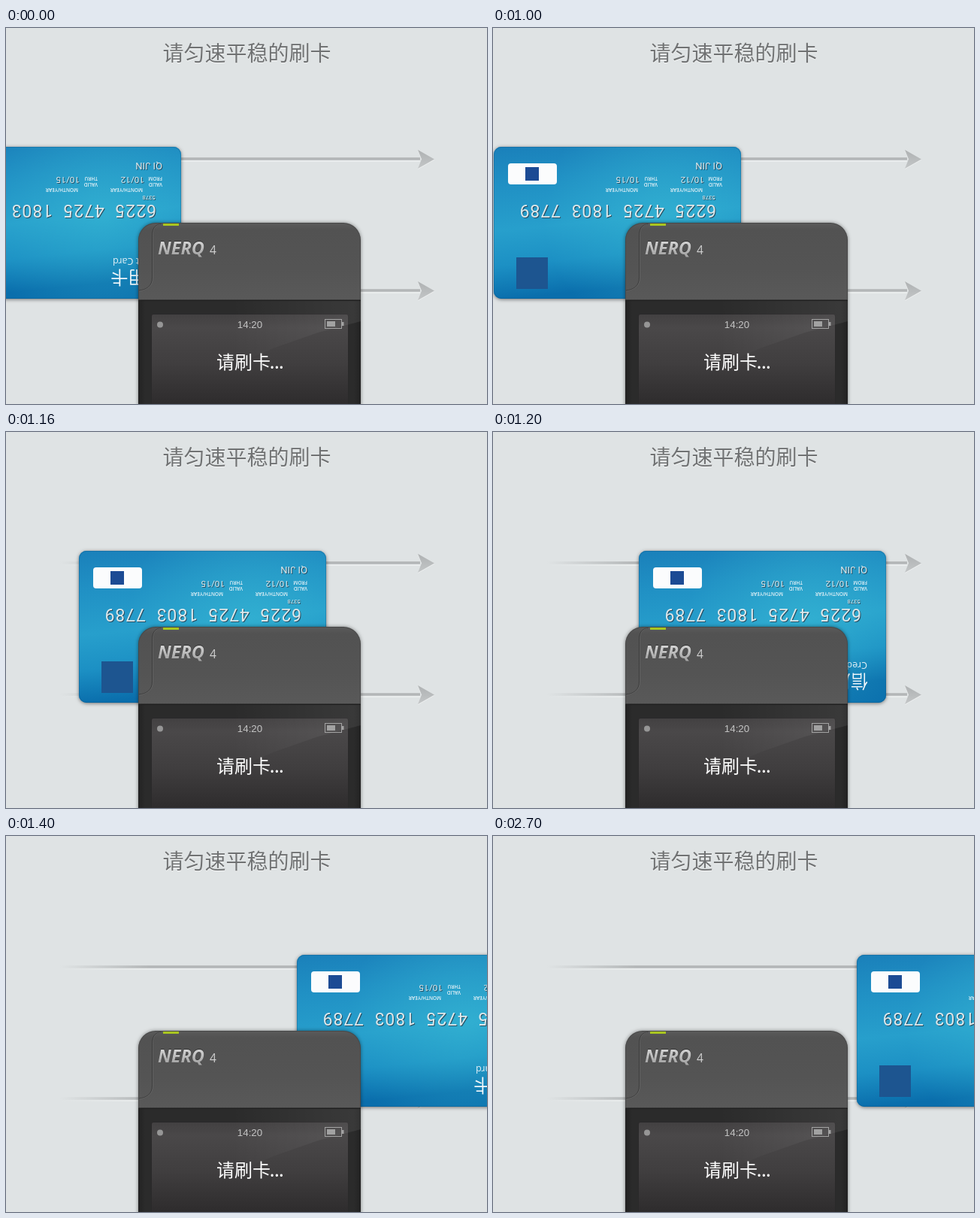
Recreate the animation shown at these times as an HTML page with a canvas. Size 640x500 px, loop 3.5 s.

```html
<!DOCTYPE html>
<html lang="zh-CN">
<head>
<meta charset="utf-8">
<title>刷卡</title>
<style>
html, body { margin: 0; width: 100%; height: 100%; overflow: hidden; background: #dfe3e4; }
canvas { display: block; }
</style>
</head>
<body>
<canvas id="stage" width="640" height="500"></canvas>
<script>
const ctx = document.getElementById('stage').getContext('2d');
const CJK = '"Noto Sans CJK SC", "Noto Sans CJK", sans-serif';
const SANS = '"Open Sans", "Noto Sans", sans-serif';
const DIGITS = 'Roboto, sans-serif';
const LOOP = 3500, HOLD = 1000, STEP = 100, LAST = 6;
const CARD = { w: 329, h: 202, y: 158, from: -96, to: 484 };

function text(str, x, y, font, color, align = 'left') {
  ctx.font = font;
  ctx.fillStyle = color;
  ctx.textAlign = align;
  ctx.fillText(str, x, y);
}

function raised(str, x, y, font, spacing = '0px') {
  ctx.letterSpacing = spacing;
  text(str, x - 1, y - 1, font, 'rgba(40,50,62,.75)');
  text(str, x, y, font, '#dde8eb');
  ctx.letterSpacing = '0px';
}

function fade(x0, y0, x1, y1, ...stops) {
  const g = ctx.createLinearGradient(x0, y0, x1, y1);
  stops.forEach(([at, color]) => g.addColorStop(at, color));
  return g;
}

function box(x, y, w, h, r, fill) {
  ctx.beginPath();
  ctx.roundRect(x, y, w, h, r);
  ctx.fillStyle = fill;
  ctx.fill();
}

function shadow(color, blur, y = 0) {
  ctx.shadowColor = color;
  ctx.shadowBlur = blur;
  ctx.shadowOffsetY = y;
}

function polygon(points, fill) {
  ctx.beginPath();
  points.forEach(([x, y]) => ctx.lineTo(x, y));
  ctx.closePath();
  ctx.fillStyle = fill;
  ctx.fill();
}

function arrow(y) {
  const row = (top, height, color) => {
    ctx.fillStyle = fade(72, 0, 190, 0, [0, color + '00'], [1, color]);
    ctx.fillRect(72, y + top, 479, height);
  };
  row(-2, 1, '#bcbfc0');
  row(-1, 2, '#b3b6b7');
  row(1, 1, '#c0c3c4');
  row(2, 2, '#eaeded');
  const mid = y + .5;
  const head = [[548, mid - 12.5], [570, mid], [548, mid + 12.5], [553, mid]];
  polygon(head.map(([px, py]) => [px, py + 1]), '#eef0f0');
  polygon(head, fade(0, mid - 12, 0, mid + 12, [0, '#afb2b3'], [1, '#c3c6c7']));
}

function cardFace() {
  const small = '600 6.5px ' + SANS;
  text('信用卡', 24, 37, '300 23.3px ' + CJK, '#f2f8fb');
  text('Credit Card', 25, 54, '12.6px ' + SANS, '#e3f0f6');
  ['6225', '4725', '1803', '7789'].forEach((group, i) =>
    raised(group, 33 + 69 * i, 125, '23px ' + DIGITS, '0.9px'));
  raised('5378', 34, 137, '7.8px ' + DIGITS);
  [[25, 'FROM', '10/12'], [111, 'THRU', '10/15']].forEach(([u, word, date]) => {
    text('MONTH/YEAR', u + 26, 147, small, '#e6f2f7');
    text('VALID', u, 154, small, '#e6f2f7');
    text(word, u, 162, small, '#e6f2f7');
    raised(date, u + 24, 162, '11.8px ' + DIGITS);
  });
  raised('QI JIN', 25, 181, '13px ' + DIGITS);
}

function card(x) {
  const { w, h, y } = CARD;
  ctx.save();
  ctx.translate(x, y);
  shadow('rgba(0,0,0,.5)', 5, 1);
  box(0, 0, w, h, 10, '#1a7db5');
  shadow('transparent', 0);
  box(0, 0, w, h, 10, fade(0, 0, 20, h,
    [0, '#1a80ba'], [.25, '#2090c4'], [.55, '#279fcc'], [.78, '#1c90c4'], [1, '#0a6eac']));

  // soft sheen
  const sheen = ctx.createRadialGradient(225, 92, 5, 225, 92, 160);
  sheen.addColorStop(0, 'rgba(62,195,215,.42)');
  sheen.addColorStop(1, 'rgba(62,195,215,0)');
  box(0, 0, w, h, 10, sheen);
  ctx.beginPath();
  ctx.roundRect(.5, .5, w - 1, h - 1, 10);
  ctx.strokeStyle = 'rgba(10,80,130,.3)';
  ctx.stroke();

  box(19, 22, 65, 28, 4, '#fbfcfd');
  box(42, 27, 18, 18, 0, '#1c4b94');
  box(30, 147, 42, 42, 0, '#1d5590');

  ctx.translate(w, h);
  ctx.rotate(Math.PI);
  cardFace();
  ctx.restore();
}

function slotEdge(dx, color) {
  ctx.beginPath();
  ctx.moveTo(207 + dx, 260.5);
  ctx.bezierCurveTo(198 + dx, 261, 194.5 + dx, 267, 194.5 + dx, 276);
  ctx.lineTo(194.5 + dx, 332);
  ctx.bezierCurveTo(194.5 + dx, 343, 187 + dx, 348, 177, 349 + dx);
  ctx.strokeStyle = color;
  ctx.stroke();
}

function reader() {
  shadow('rgba(0,0,0,.45)', 5);
  box(176, 259, 296, 260, [23, 23, 0, 0], '#484848');
  shadow('transparent', 0);
  box(177, 260, 294, 101, [22, 22, 0, 0],
    fade(0, 260, 0, 361, [0, '#5a5a5a'], [.08, '#525252'], [.6, '#545454'], [1, '#595959']));
  slotEdge(0, '#3c3c3c');
  slotEdge(1, 'rgba(255,255,255,.08)');
  box(209, 260, 21, 3, 0, '#a9c520');

  const metal = fade(0, 283, 0, 302, [0, '#d6d6d6'], [1, '#a5a5a5']);
  text('NERQ', 202, 300, 'italic 700 23.5px ' + SANS, '#333');
  text('NERQ', 202, 301, 'italic 700 23.5px ' + SANS, metal);
  text('4', 271, 301, '15.5px ' + SANS, '#d0d0d0');

  // lower body and screen
  box(176, 361, 296, 139, 0, fade(176, 0, 472, 0,
    [0, '#222'], [.03, '#2b2b2b'], [.97, '#2b2b2b'], [1, '#222']));
  box(176, 361, 296, 1, 0, '#383838');
  box(176, 362, 296, 1, 0, '#202020');
  box(193, 380, 263, 120, [3, 3, 0, 0], '#2a292a');
  box(194, 381, 261, 119, [2, 2, 0, 0],
    fade(0, 381, 0, 500, [0, '#434142'], [.15, '#4a4849'], [.55, '#403e3f'], [1, '#2e2c2d']));
  polygon([[300, 363], [472, 363], [472, 390], [415, 405], [355, 426], [300, 450]],
    fade(300, 0, 472, 0, [0, 'rgba(255,255,255,0)'], [1, 'rgba(255,255,255,.07)']));

  ctx.beginPath();
  ctx.arc(205, 394.5, 4, 0, 7);
  ctx.fillStyle = '#969696';
  ctx.fill();
  text('14:20', 324.5, 399, '13.3px "Liberation Sans", Arial, sans-serif', '#c4c4c4', 'center');
  ctx.strokeStyle = '#a2a2a2';
  ctx.strokeRect(424.5, 387.5, 22, 12);
  box(447, 391, 2.5, 5, 0, '#a2a2a2');
  box(427, 390, 11, 7, 0, '#a2a2a2');
  text('请刷卡', 280, 453, '500 24px ' + CJK, '#fff');
  text('...', 351, 453, '600 22.5px ' + SANS, '#fff');
}

function draw(time) {
  const step = time < HOLD ? 0 : Math.min(LAST, 1 + Math.floor((time - HOLD) / STEP));
  ctx.fillStyle = '#dfe3e4';
  ctx.fillRect(0, 0, 640, 500);
  const title = '请匀速平稳的刷卡';
  text(title, 320.5, 44.5, '28px ' + CJK, '#f7f8f8', 'center');
  text(title, 320.5, 43.5, '28px ' + CJK, '#707273', 'center');
  arrow(174);
  arrow(349);
  card(Math.round(CARD.from + (CARD.to - CARD.from) * step / LAST));
  reader();
}

const start = performance.now();
function tick() {
  draw((performance.now() - start) % LOOP);
  requestAnimationFrame(tick);
}
tick();
</script>
</body>
</html>
```
